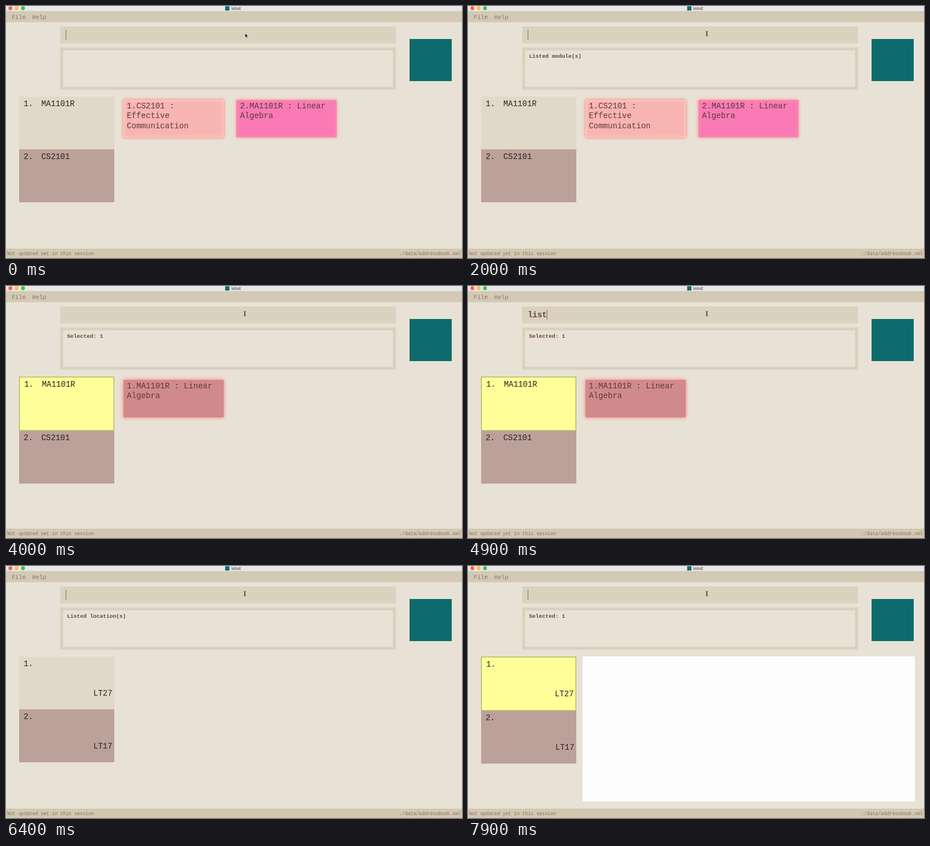
An HTML page that plays this animation: 800 px wide and 443 px high, repeating every 8000 ms.

```html
<!DOCTYPE html>
<html lang="en">
<head>
<meta charset="utf-8">
<title>WibE</title>
<style>
  html, body { margin: 0; width: 100%; height: 100%; overflow: hidden; background: #e8e2d6; }
  #stage { position: relative; width: 800px; height: 443px; overflow: hidden; }
  svg { position: absolute; left: 0; top: 0; }
  text { font: 13.9px "Courier New", "Liberation Mono", monospace; fill: #2b2422; white-space: pre; }
  .menu { font-size: 10.3px; fill: #8b7866; }
  .status { font-size: 8.2px; fill: #84725f; }
  .title { font: 7.5px "Liberation Sans", Arial, sans-serif; fill: #444; }
  .bold { font-weight: bold; fill: #66443e; }
  #message { font-size: 9.6px; }
  .cardtext { fill: #5d3a3c; }
  .end { text-anchor: end; }
  .card { position: absolute; top: 165px; width: 176px; height: 66px; border-radius: 2px; }
  .salmon { left: 206px; background: #f8b4b1; box-shadow: 0 0 5px 1px #f98f88, inset 0 0 5px 1px #fbd3c6; }
  .pink { left: 404px; background: #f97ab5; box-shadow: 0 0 5px 1px #f9a49c, inset 0 0 7px 1px #f990b0; }
  .rose { left: 206px; background: #d08a8c; box-shadow: 0 0 6px 1px #f5938f, inset 0 0 7px 1px #dd8588; }
  [data-in] { visibility: hidden; }
  [data-in].on { visibility: visible; }
</style>
</head>
<body>
<div id="stage">
  <div class="card salmon" data-in="modules"></div>
  <div class="card pink" data-in="modules"></div>
  <div class="card rose" data-in="module"></div>

  <svg width="800" height="443" viewBox="0 0 800 443">
    <rect width="800" height="10" fill="#e9e6e8"/>
    <rect y="9" width="800" height="1" fill="#d0c8c0"/>
    <circle cx="7.7" cy="4" r="3.4" fill="#fb5f58"/>
    <circle cx="18.7" cy="4" r="3.4" fill="#fcbc40"/>
    <circle cx="29.8" cy="4" r="3.4" fill="#34c84a"/>
    <rect x="384.5" y="0.5" width="7.5" height="7.5" fill="#0e6b6d"/>
    <text class="title" x="395" y="7">WibE</text>

    <rect y="10" width="800" height="18.5" fill="#d4c9b4"/>
    <text class="menu" x="10" y="23">File</text>
    <text class="menu" x="46" y="23">Help</text>

    <rect x="95" y="36" width="589" height="29.5" fill="#dbd1bf"/>
    <rect x="97.5" y="75.5" width="584" height="69" fill="none" stroke="#dbd1bf" stroke-width="5.4"/>
    <text id="command" class="bold" x="105" y="54.5"></text>
    <rect id="caret" y="42" width="1" height="17" fill="#7b625a"/>
    <text id="message" class="bold" x="107" y="91"></text>

    <rect x="708" y="58" width="74" height="74" fill="#0e6b6d"/>

    <g id="first">
      <rect id="firstBox" x="23" y="159.5" width="167" height="93" fill="#e0d8c9"/>
      <text x="31" y="175.5">1.</text>
      <text class="name" x="62" y="175.5">MA1101R</text>
    </g>
    <text id="firstRoom" class="room end" x="186.5" y="228">LT27</text>
    <g id="second">
      <rect x="23" y="252" width="167" height="93" fill="#bba199"/>
      <text x="31" y="268.5">2.</text>
      <text class="name" x="62" y="268.5">CS2101</text>
      <text class="room end" x="186.5" y="321">LT17</text>
    </g>

    <g data-in="modules">
      <text class="cardtext" x="212" y="179.5">1.CS2101 :</text>
      <text class="cardtext" x="212" y="197">Effective</text>
      <text class="cardtext" x="212" y="214.5">Communication</text>
      <text class="cardtext" x="410.5" y="179.5">2.MA1101R : Linear</text>
      <text class="cardtext" x="410.5" y="197">Algebra</text>
    </g>
    <g data-in="module">
      <text class="cardtext" x="212" y="179.5">1.MA1101R : Linear</text>
      <text class="cardtext" x="212" y="197">Algebra</text>
    </g>
    <rect data-in="location" x="201" y="159" width="583" height="255" fill="#fdfdfe"/>

    <rect y="426.5" width="800" height="16.5" fill="#d3c7b2"/>
    <text class="status" x="2" y="437.5">Not updated yet in this session</text>
    <text class="status end" x="798" y="437.5">./data/addressbook.xml</text>

    <path id="arrow" d="M419.5 48v7.6l1.8-1.6 1.2 2.7 1.2-.5-1.2-2.7h2.4z" fill="#111" stroke="#fff" stroke-width=".5"/>
    <path id="beam" d="M417.3 44.5q1.7 0 1.7 1v6q0 1-1.7 1M420.7 44.5q-1.7 0-1.7 1v6q0 1 1.7 1M418 49h2" fill="none" stroke="#222" stroke-width=".9"/>
  </svg>
</div>

<script>
  const LOOP = 8000, KEY = 90, CHAR = 8.34;
  const commands = [
    { start: 500, enter: 1800, text: "list module", message: "Listed module(s)", view: "modules" },
    { start: 2500, enter: 3450, text: "select 1", message: "Selected: 1", view: "module" },
    { start: 4600, enter: 6000, text: "list location", message: "Listed location(s)", view: "locations" },
    { start: 6600, enter: 7700, text: "select 1", message: "Selected: 1", view: "location" }
  ];
  const $ = id => document.getElementById(id);
  const show = (el, on) => { el.style.visibility = on ? "visible" : "hidden"; };
  const all = (selector, fn) => document.querySelectorAll(selector).forEach(fn);

  function setView(view) {
    const selected = view === "module" || view === "location";
    const rooms = view.startsWith("location");
    all("[data-in]", el => el.classList.toggle("on", el.dataset.in === view));
    all(".name", el => show(el, !rooms));
    all(".room", el => show(el, rooms));

    const box = $("firstBox");
    const attrs = selected
      ? { x: 22.5, y: 159, width: 165.7, height: 94, fill: "#fffe99", stroke: "#91a53a" }
      : { x: 23, y: 159.5, width: 167, height: 93, fill: "#e0d8c9", stroke: "none" };
    for (const name in attrs) box.setAttribute(name, attrs[name]);
    $("first").setAttribute("transform", selected ? "translate(1 1)" : "");
    $("firstRoom").setAttribute("transform", selected ? "translate(-1 1)" : "");
    $("second").setAttribute("transform", selected ? "translate(0 2.4)" : "");
  }

  let shown = "";
  function draw(t) {
    let text = "", message = "", view = "modules", lastKey = 0;
    for (const c of commands) {
      if (t >= c.enter) {
        ({ message, view } = c);
        lastKey = c.enter;
      } else if (t >= c.start) {
        const count = Math.min(c.text.length, Math.floor((t - c.start) / KEY) + 1);
        text = c.text.slice(0, count);
        lastKey = c.start + (count - 1) * KEY;
      }
    }
    $("command").textContent = text;
    $("message").textContent = message;
    $("caret").setAttribute("x", 104.7 + text.length * CHAR);
    show($("caret"), (t - lastKey) % 1000 < 500);
    show($("arrow"), t < 300);
    show($("beam"), t >= 300);
    if (view !== shown) setView(shown = view);
  }

  const begin = performance.now();
  function tick() {
    draw((performance.now() - begin) % LOOP);
    requestAnimationFrame(tick);
  }
  tick();
</script>
</body>
</html>
```
